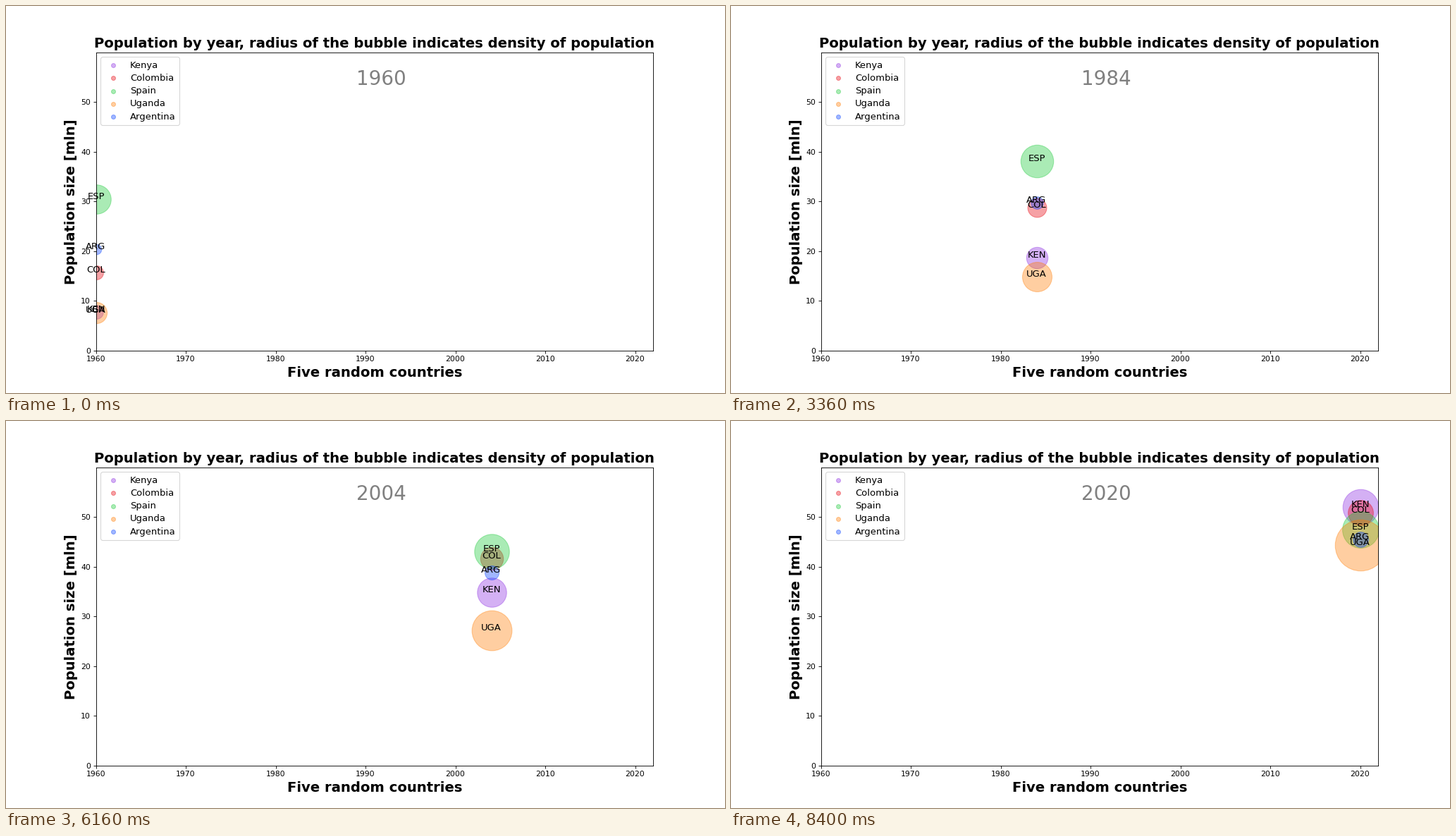
A matplotlib script that plays this animation: 1020x549 px, repeating every 8.54 s.

```python
import numpy as np
import matplotlib.pyplot as plt
from matplotlib.animation import FuncAnimation

WIDTH, HEIGHT = 1020.01, 549.01  # tiny surplus guards against truncation
DPI = 1020 / 13
FIRST, LAST = 1960, 2020
SIZE_PER_DENSITY = 24.1  # marker area (pt^2) per inhabitant per km^2

plt.rcParams["font.family"] = "DejaVu Sans"


class Country:
    """Population follows a cubic trend, plus an optional boom around 2004."""

    def __init__(self, name, code, color, area, trend, boom=0):
        self.name, self.code, self.color = name, code, color
        self.area = area  # mln km^2
        self.trend = np.polyfit((0, 20, 40, 60), trend, 3)
        self.boom = boom

    def population(self, year):
        surge = self.boom / (1 + np.exp((2004.5 - year) / 1.9))
        return np.polyval(self.trend, year - FIRST) + surge


COUNTRIES = [
    Country("Kenya", "KEN", "#8b2be2", 0.580, (7.75, 16.2, 31.1, 52.0)),
    Country("Colombia", "COL", "#e8000b", 1.142, (15.7, 26.2, 39.1, 50.9)),
    Country("Spain", "ESP", "#1ac938", 0.506, (30.4, 37.25, 40.2, 41.4), 6),
    Country("Uganda", "UGA", "#ff7c00", 0.2416, (7.65, 13.2, 24.0, 44.4)),
    Country("Argentina", "ARG", "#023eff", 2.780, (20.35, 28.0, 36.95, 45.4)),
]

fig, ax = plt.subplots(figsize=(WIDTH / DPI, HEIGHT / DPI), dpi=DPI)
fig.subplots_adjust(left=0.125, right=0.9, bottom=0.11, top=0.88)
ax.set_xlim(FIRST, 2022)
ax.set_ylim(0, 59.95)
ax.set_xticks(range(1960, 2021, 10))
ax.set_yticks(range(0, 51, 10))

heading = dict(fontsize=18, fontweight="bold")
ax.set_title("Population by year, radius of the bubble "
             "indicates density of population", **heading)
ax.set_xlabel("Five random countries", **heading)
ax.set_ylabel("Population size [mln]", **heading)

bubbles = [ax.scatter([FIRST], [0], s=30, color=c.color, alpha=0.37,
                      label=c.name) for c in COUNTRIES]
tags = [ax.text(FIRST, 0, c.code, fontsize=12, ha="center")
        for c in COUNTRIES]
year_text = ax.text(1988.95, 53.45, str(FIRST), fontsize=25.5, color="gray")

legend = ax.legend(loc="upper left", fontsize=12, labelspacing=0.4)
for handle in legend.legend_handles:
    handle.set_sizes([30])


def update(frame):
    year = FIRST + frame
    for country, bubble, tag in zip(COUNTRIES, bubbles, tags):
        population = country.population(year)
        bubble.set_offsets([(year, population)])
        bubble.set_sizes([SIZE_PER_DENSITY * population / country.area])
        tag.set_position((year, population))
    year_text.set_text(str(year))
    return [*bubbles, *tags, year_text]


anim = FuncAnimation(fig, update, frames=LAST - FIRST + 1, interval=140,
                     repeat=True, repeat_delay=0, blit=False)
plt.show()
```
